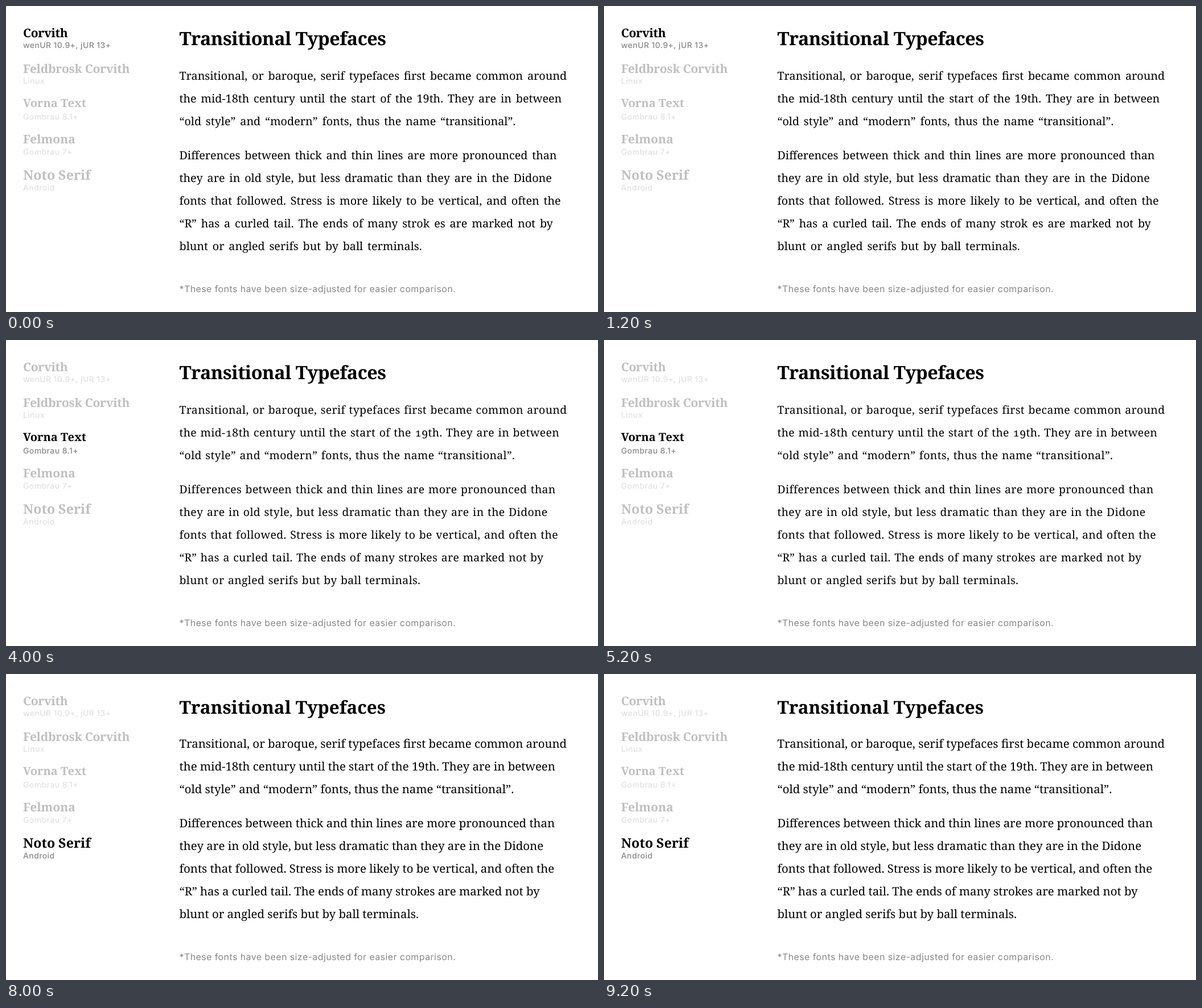
Write an HTML page that moves like this. It is 1040 by 539 pixels and loops after 10 s.

```html
<!DOCTYPE html>
<html lang="en">
<head>
<meta charset="utf-8">
<title>Transitional Typefaces</title>
<style>
  html, body { margin: 0; width: 100%; height: 100%; overflow: hidden; background: #fff; }
  svg { display: block; text-rendering: geometricPrecision; }
  text { white-space: pre; }
  .serif, .page { font-family: "Noto Serif", serif; }
  .bold { font-weight: 700; }
  .sub, .note { font-family: Inter, "Open Sans", sans-serif; letter-spacing: .4px; fill: #888; }
  .sub { font-size: 14px; font-weight: 500; }
  .note { font-size: 16px; }
  .item { --rest: .25; }
  .page { --rest: 0; }
  .item, .page {
    opacity: var(--rest);
    animation: turn 10s step-end infinite;
    animation-delay: calc(var(--i) * 2s - 10s);
  }
  @keyframes turn {
    0% { opacity: 1; }
    20%, 100% { opacity: var(--rest); }
  }
</style>
</head>
<body>
<svg id="stage" width="1040" height="539" viewBox="0 0 1040 539">
  <text class="note" x="304.5" y="504">*These fonts have been size-adjusted for easier comparison.</text>
</svg>
<script>
const lines = [
  "Transitional, or baroque, serif typefaces first became common around",
  "the mid-18th century until the start of the 19th. They are in between",
  "“old style” and “modern” fonts, thus the name “transitional”.",
  "Differences between thick and thin lines are more pronounced than",
  "they are in old style, but less dramatic than they are in the Didone",
  "fonts that followed. Stress is more likely to be vertical, and often the",
  "“R” has a curled tail. The ends of many strokes are marked not by",
  "blunt or angled serifs but by ball terminals."
];

const wide = { size: 19.76, word: 2.68, letter: 0, y: 129.5 };
const plain = { size: 20.4, word: 0, letter: 0, y: 129.5 };
const airy = { size: 19.4, word: 1.1, letter: .36, y: 130.4, figures: "oldstyle-nums" };
const tight = { size: 32.4, letter: -.5, y: 69 };
const even = { size: 31.4, letter: 0, y: 70 };

const faces = [
  { name: "Corvith", system: "wenUR 10.9+, jUR 13+", y: 55, size: 21, letter: -.3, body: wide, head: tight, split: true },
  { name: "Feldbrosk Corvith", system: "Linux", y: 118, size: 21, letter: -.3, body: wide, head: tight },
  { name: "Vorna Text", system: "Gombrau 8.1+", y: 178, size: 20, letter: 0, body: airy, head: tight },
  { name: "Felmona", system: "Gombrau 7+", y: 242, size: 21, letter: 0, body: plain, head: even },
  { name: "Noto Serif", system: "Android", y: 306, size: 23.2, letter: 0, body: plain, head: even }
];

const stage = document.getElementById("stage");

function add(parent, tag, attrs, content = "") {
  const node = document.createElementNS(stage.namespaceURI, tag);
  for (const key in attrs) node.setAttribute(key, attrs[key]);
  node.textContent = content;
  return parent.appendChild(node);
}

const spacing = ({ size, letter, word = 0, figures = "normal" }) =>
  `font-size:${size}px;letter-spacing:${letter}px;word-spacing:${word}px;font-variant-numeric:${figures}`;

faces.forEach((face, i) => {
  const item = add(stage, "g", { class: "item", style: `--i:${i}` });
  add(item, "text", { class: "serif bold", x: 30, y: face.y, style: spacing(face) }, face.name);
  add(item, "text", { class: "sub", x: 30, y: [74, 137, 199.5, 262, 325][i] }, face.system);

  const page = add(stage, "g", { class: "page", style: `--i:${i}` });
  add(page, "text", { class: "bold", x: 304.5, y: face.head.y, style: spacing(face.head) }, "Transitional Typefaces");
  const body = add(page, "g", { style: spacing(face.body) });
  lines.forEach((line, row) => {
    const y = face.body.y + row * 40 + (row > 2 ? 20 : 0);
    add(body, "text", { x: 304.5, y }, face.split ? line.replace("strokes", "strok es") : line);
  });
});
</script>
</body>
</html>
```
